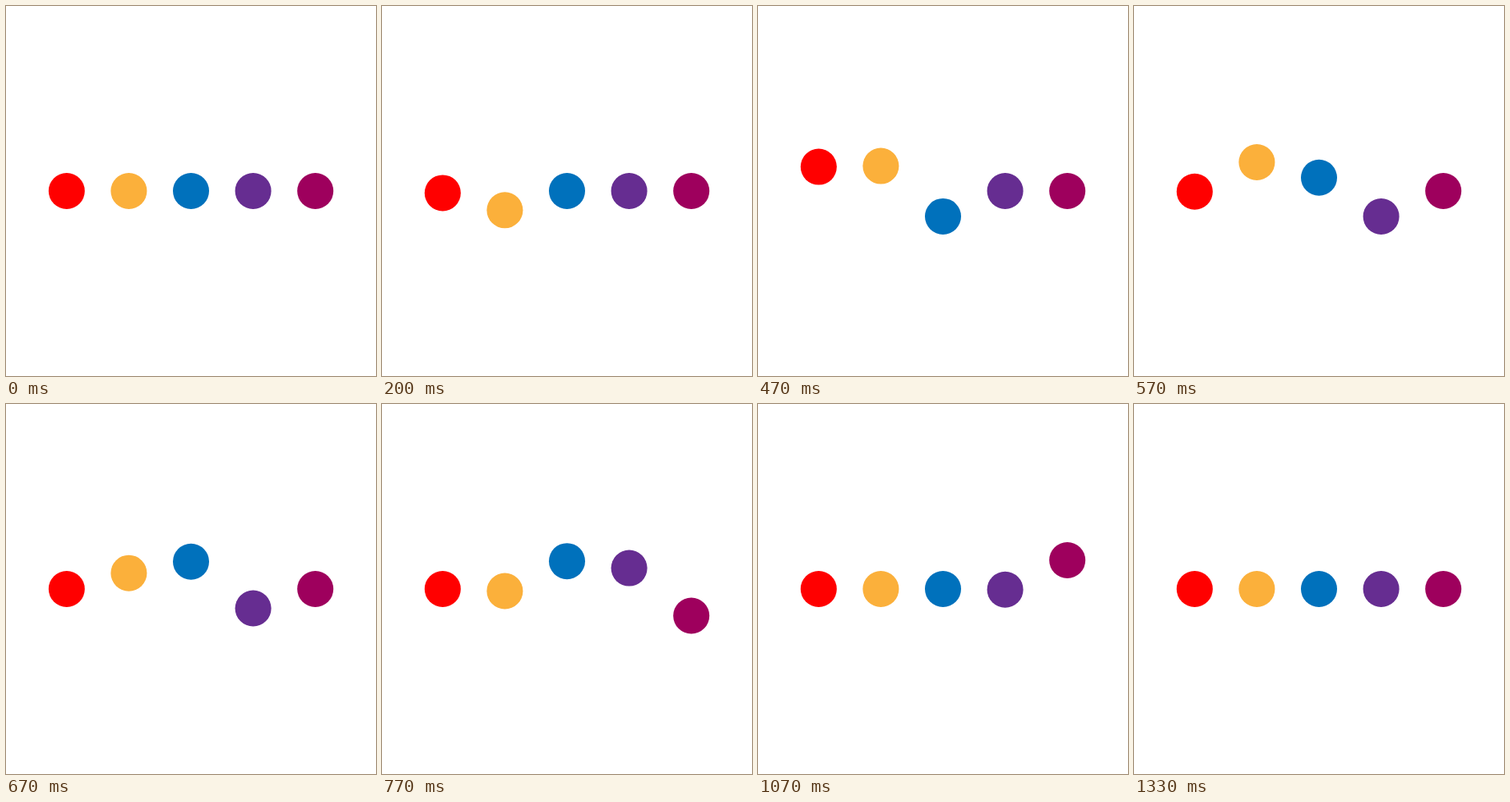
These frames come from a looping animation (450 by 450 pixels, 1360 ms). An HTML page:

```html
<!DOCTYPE html>
<html lang="en">
<head>
<meta charset="utf-8">
<title>Bouncing dots</title>
<style>
  html, body { margin: 0; width: 100%; height: 100%; overflow: hidden; background: #fff; }
  svg { display: block; width: 100vw; height: 100vh; }
</style>
</head>
<body>
<svg id="stage" viewBox="0 0 450 450"></svg>
<script>
const LOOP = 1360, FPS = 30, STAGGER = 5;
const REST = 225, RADIUS = 22, GAP = 75.6;
const COLORS = ['#ff0000', '#fbb03b', '#0071bc', '#662d91', '#9e005d'];

// One bounce: tick, vertical offset, easing of the segment that leads there
const KEYS = [
  { at: 0, y: 0 },
  { at: 3, y: 32.5, ease: [0.22, 0.61, 0.36, 1] },
  { at: 12, y: -35, ease: [0.48, 0, 0.12, 1] },
  { at: 18, y: 2.5, ease: [0.6, 0, 0.5, 1] },
  { at: 20, y: 0, ease: [0.42, 0, 0.58, 1] }
];

const cubic = (a, b, s) => 3 * (1 - s) ** 2 * s * a + 3 * (1 - s) * s * s * b + s ** 3;

function bezier([x1, y1, x2, y2], x) {
  let lo = 0, hi = 1;
  for (let i = 0; i < 24; i++) {
    const mid = (lo + hi) / 2;
    if (cubic(x1, x2, mid) < x) lo = mid; else hi = mid;
  }
  return cubic(y1, y2, (lo + hi) / 2);
}

function bounce(tick) {
  const i = KEYS.findIndex(k => k.at > tick);
  if (tick <= 0 || i < 0) return 0;
  const a = KEYS[i - 1], b = KEYS[i];
  return a.y + (b.y - a.y) * bezier(b.ease, (tick - a.at) / (b.at - a.at));
}

const stage = document.getElementById('stage');
const dots = COLORS.map((fill, i) => {
  const dot = document.createElementNS(stage.namespaceURI, 'circle');
  dot.setAttribute('cx', REST + (i - 2) * GAP);
  dot.setAttribute('r', RADIUS);
  dot.setAttribute('fill', fill);
  return stage.appendChild(dot);
});

function draw(time) {
  // Hold each tick; its start is rounded to 10 ms
  const tick = Math.floor((time % LOOP) * FPS / 1000 + 0.105);
  dots.forEach((dot, i) => dot.setAttribute('cy', REST + bounce(tick - i * STAGGER)));
}

const start = performance.now();
function frame() {
  draw(performance.now() - start);
  requestAnimationFrame(frame);
}
frame();
</script>
</body>
</html>
```
